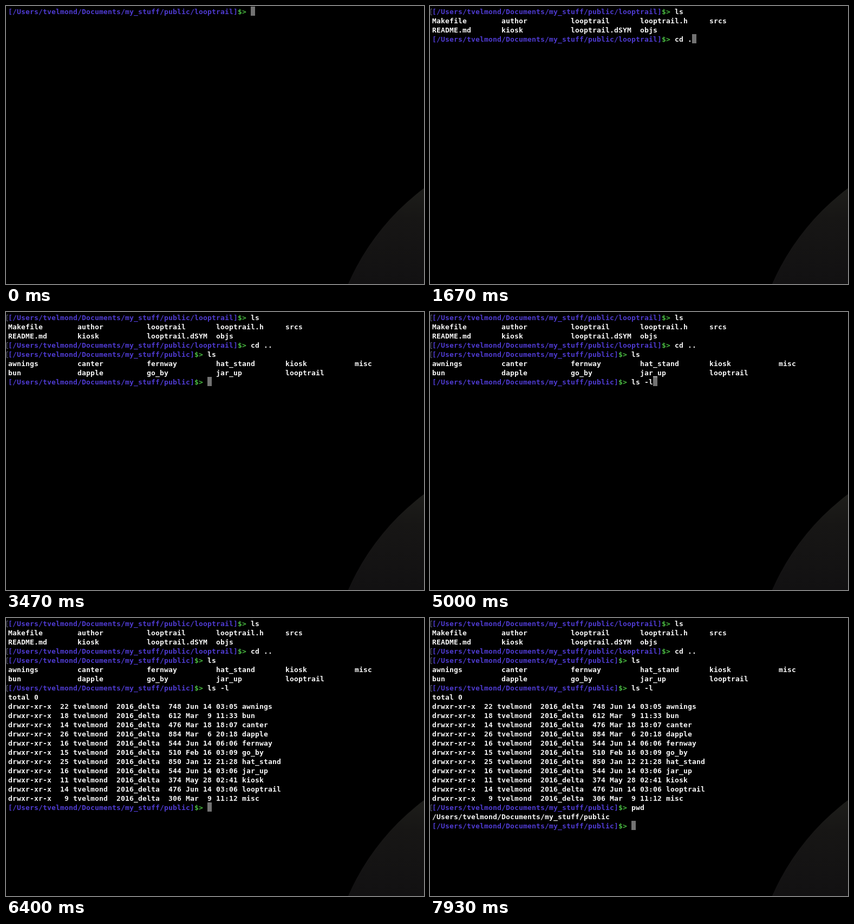
These frames come from a looping animation (772x514 px, 8000 ms). An HTML page with a canvas:

```html
<!DOCTYPE html>
<html lang="en">
<head>
<meta charset="utf-8">
<title>Terminal session</title>
<style>
  html, body { margin: 0; width: 100%; height: 100%; overflow: hidden; background: #000; }
  canvas { display: block; }
</style>
</head>
<body>
<canvas id="stage" width="772" height="514"></canvas>
<script>
const ctx = document.getElementById('stage').getContext('2d');
const LOOP = 8000, CELL = 8, ROW = 17, LEFT = 4;
const BLUE = '#4f3bd2', GREEN = '#48b840', WHITE = '#f8f8f8', CURSOR = '#727272', MARK = '#62627a';

const parent = '/Users/tvelmond/Documents/my_stuff/public';
const project = parent + '/looptrail';

const columns = (...names) => names.map(name => name.padEnd(16)).join('');
const entry = (links, size, date, name) =>
  `drwxr-xr-x  ${String(links).padStart(2)} tvelmond  2016_delta  ${size} ${date} ${name}`;

// keys: time of each typed character; enter: time the command runs
const session = [
  { cwd: project, command: 'ls', keys: [200, 330], enter: 600, output: [
    columns('Makefile', 'author', 'looptrail', 'looptrail.h', 'srcs'),
    columns('README.md', 'kiosk', 'looptrail.dSYM', 'objs') ] },
  { cwd: project, command: 'cd ..', keys: [930, 1070, 1270, 1530, 1735], enter: 1930, output: [] },
  { cwd: parent, command: 'ls', keys: [2130, 2270], enter: 2470, output: [
    columns('awnings', 'canter', 'fernway', 'hat_stand', 'kiosk', 'misc'),
    columns('bun', 'dapple', 'go_by', 'jar_up', 'looptrail') ] },
  { cwd: parent, command: 'ls -l', keys: [4000, 4130, 4330, 4530, 4730], enter: 5330, output: [
    'total 0',
    entry(22, 748, 'Jun 14 03:05', 'awnings'),
    entry(18, 612, 'Mar  9 11:33', 'bun'),
    entry(14, 476, 'Mar 18 18:07', 'canter'),
    entry(26, 884, 'Mar  6 20:18', 'dapple'),
    entry(16, 544, 'Jun 14 06:06', 'fernway'),
    entry(15, 510, 'Feb 16 03:09', 'go_by'),
    entry(25, 850, 'Jan 12 21:28', 'hat_stand'),
    entry(16, 544, 'Jun 14 03:06', 'jar_up'),
    entry(11, 374, 'May 28 02:41', 'kiosk'),
    entry(14, 476, 'Jun 14 03:06', 'looptrail'),
    entry(9, 306, 'Mar  9 11:12', 'misc') ] },
  { cwd: parent, command: 'pwd', keys: [6670, 6800, 6930], enter: 7200, output: [parent] },
  { cwd: parent, command: '', keys: [], enter: Infinity, output: [] }
];

const sphereShade = ctx.createLinearGradient(0, 340, 0, 514);
sphereShade.addColorStop(0, '#1d1d1a');
sphereShade.addColorStop(0.3, '#171615');
sphereShade.addColorStop(1, '#121112');

// Each character sits in its own cell of the terminal grid
function write(text, column, row, color) {
  ctx.fillStyle = color;
  [...text].forEach((char, i) =>
    ctx.fillText(char, LEFT + (column + i) * CELL, 15 + row * ROW));
}

function drawMark(row) {
  const y = row * ROW + 5.5;
  ctx.strokeStyle = MARK;
  ctx.beginPath();
  ctx.moveTo(4, y);
  ctx.lineTo(1.5, y);
  ctx.lineTo(1.5, y + 11);
  ctx.lineTo(4, y + 11);
  ctx.stroke();
}

function drawBackground() {
  ctx.fillStyle = '#000';
  ctx.fillRect(0, 0, 772, 514);
  ctx.fillStyle = sphereShade;
  ctx.beginPath();
  ctx.arc(1037, 690.6, 442, 0, Math.PI * 2);
  ctx.fill();
}

function draw(time) {
  drawBackground();
  ctx.font = 'bold 13px "DejaVu Sans Mono", monospace';
  let row = 0;
  for (const { cwd, command, keys, enter, output } of session) {
    const prompt = `[${cwd}]`;
    const typed = command.slice(0, keys.filter(key => key <= time).length);
    const start = prompt.length + 3;
    write(prompt, 0, row, BLUE);
    write('$>', prompt.length, row, GREEN);
    write(typed, start, row, WHITE);
    if (time < enter) {
      ctx.fillStyle = CURSOR;
      ctx.fillRect(LEFT + (start + typed.length) * CELL, 1 + row * ROW, CELL, ROW);
      return;
    }
    drawMark(row++);
    for (const line of output) write(line, 0, row++, WHITE);
  }
}

function tick() {
  draw(performance.now() % LOOP);
  requestAnimationFrame(tick);
}
tick();
</script>
</body>
</html>
```
